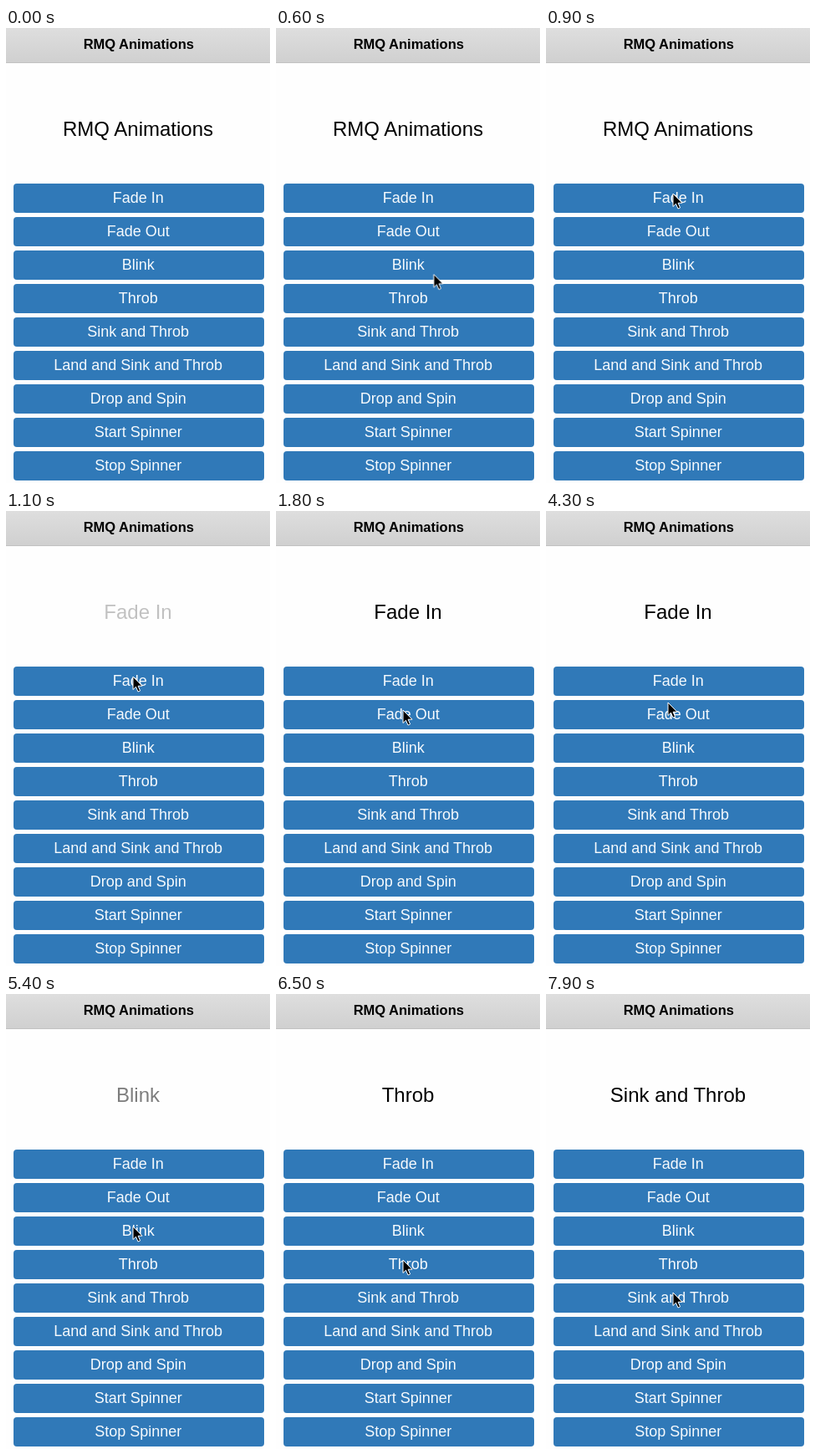
These frames come from a looping animation (316x544 px, 8 s). An HTML page:

```html
<!DOCTYPE html>
<html lang="en">
<head>
<meta charset="utf-8">
<title>RMQ Animations</title>
<style>
html, body {
  margin: 0;
  width: 100%;
  height: 100%;
  overflow: hidden;
  background: #fefefe;
}
svg {
  display: block;
  width: 316px;
  height: 544px;
  font-family: "Liberation Sans", Arial, Helvetica, sans-serif;
  text-anchor: middle;
}
.title { font-size: 16.5px; font-weight: bold; }
.button rect { fill: #3079b8; }
.button text { font-size: 18px; fill: #f6fafd; }
.label {
  font-size: 24px;
  transform-origin: 158px 121px;
}
.label, .cursor { animation: 8s linear infinite; }
.intro { animation-name: intro; }
.fade-in { animation-name: fade-in; }
.fade-out { animation-name: fade-out; }
.blink { animation-name: blink; }
.throb { animation-name: throb-show, throb; }
.sink { animation-name: sink; }
.cursor { animation-name: point; animation-timing-function: ease-in-out; }

/* 1.25% is 100 ms */
@keyframes intro {
  0% { opacity: 1; animation-timing-function: step-end; }
  12.5%, 100% { opacity: 0; }
}
@keyframes fade-in {
  0% { opacity: 0; }
  12.5% { opacity: 0; animation-timing-function: ease-in-out; }
  16.25% { opacity: 1; animation-timing-function: step-end; }
  25% { opacity: 0; }
  38.5% { opacity: 0; animation-timing-function: ease-in-out; }
  41.25% { opacity: 1; animation-timing-function: step-end; }
  63.75%, 100% { opacity: 0; }
}
@keyframes fade-out {
  0% { opacity: 0; animation-timing-function: step-end; }
  25% { opacity: 1; animation-timing-function: ease-in-out; }
  28.75%, 100% { opacity: 0; }
}
@keyframes blink {
  0% { opacity: 0; animation-timing-function: step-end; }
  63.75% { opacity: 1; animation-timing-function: ease-in-out; }
  66.25% { opacity: 0; animation-timing-function: ease-in-out; }
  68.75% { opacity: 1; animation-timing-function: step-end; }
  81.25%, 100% { opacity: 0; }
}
@keyframes throb-show {
  0% { opacity: 0; animation-timing-function: step-end; }
  81.25% { opacity: 1; animation-timing-function: step-end; }
  98.75%, 100% { opacity: 0; }
}
@keyframes throb {
  0% { transform: scale(1); }
  82.25% { transform: scale(1); animation-timing-function: ease-out; }
  83.5% { transform: scale(1.1); animation-timing-function: ease-in; }
  88.5%, 100% { transform: scale(1); }
}
@keyframes sink {
  0% { opacity: 0; animation-timing-function: step-end; }
  98.75%, 100% { opacity: 1; }
}
@keyframes point {
  0%, 1.25% { transform: translate(290px, 560px); }
  11%, 18.5% { transform: translate(152px, 198px); }
  22.25%, 34% { transform: translate(152px, 238px); }
  37.25%, 46.25% { transform: translate(146px, 207px); }
  53.5%, 54.5% { transform: translate(146px, 229px); }
  58.5%, 73% { transform: translate(152px, 278px); }
  77.5%, 92% { transform: translate(152px, 318px); }
  97.5%, 100% { transform: translate(152px, 357px); }
}
</style>
</head>
<body>
<svg viewBox="0 0 316 544">
  <defs>
    <linearGradient id="bar" x2="0" y2="1">
      <stop offset="0" stop-color="#dedede"/>
      <stop offset="1" stop-color="#d0d0d0"/>
    </linearGradient>
  </defs>
  <rect width="316" height="41" fill="url(#bar)"/>
  <rect y="41" width="316" height="1" fill="#c2c2c2"/>
  <text class="title" x="158.8" y="25">RMQ Animations</text>

  <text class="label intro" x="158" y="129">RMQ Animations</text>
  <text class="label fade-in" x="158" y="129">Fade In</text>
  <text class="label fade-out" x="158" y="129">Fade Out</text>
  <text class="label blink" x="158" y="129">Blink</text>
  <text class="label throb" x="158" y="129">Throb</text>
  <text class="label sink" x="158" y="129">Sink and Throb</text>

  <g id="menu"></g>

  <path class="cursor" d="M0 0V15.5L3.5 12.2L6 18L8.6 16.9L6.1 11.2H11Z"
        fill="#000" stroke="#fff" stroke-width="1"/>
</svg>
<script>
const names = ["Fade In", "Fade Out", "Blink", "Throb", "Sink and Throb",
  "Land and Sink and Throb", "Drop and Spin", "Start Spinner", "Stop Spinner"];
document.getElementById("menu").innerHTML = names.map((name, i) => `
  <g class="button" transform="translate(9 ${186 + 40 * i})">
    <rect width="300" height="35" rx="4"/>
    <text x="149.2" y="23">${name}</text>
  </g>`).join("");
</script>
</body>
</html>
```
